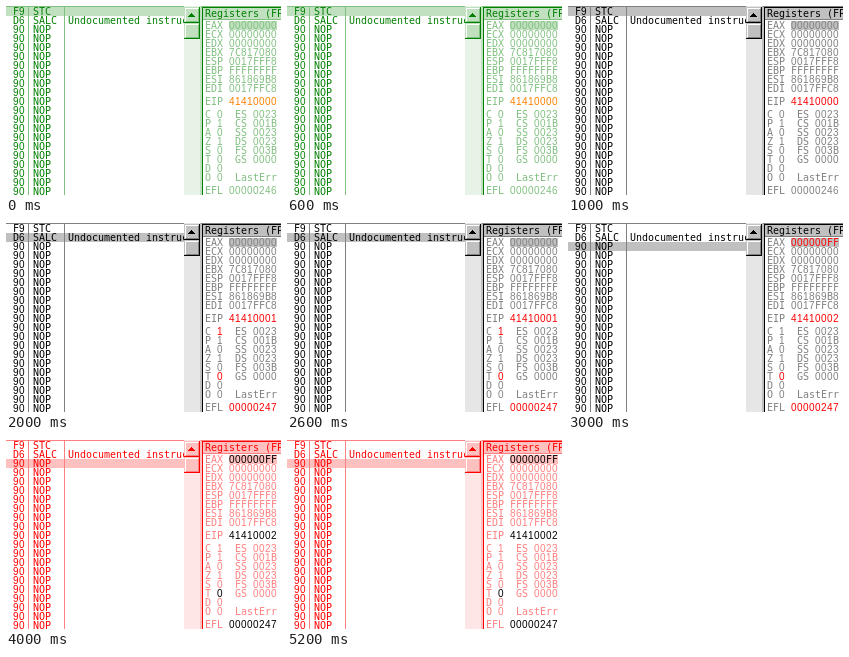
Write an HTML page with a canvas that moves like this. It is 275x189 px and loops after 6000 ms.

```html
<!DOCTYPE html>
<html lang="en">
<head>
<meta charset="utf-8">
<title>Stepping through instructions</title>
<style>
html, body { margin: 0; width: 100%; height: 100%; overflow: hidden; background: #fff; }
canvas { display: block; }
</style>
</head>
<body>
<canvas id="stage" width="275" height="189"></canvas>
<script>
const ctx = document.getElementById('stage').getContext('2d');
const CELL = 6, ROW = 9;

const plain = { ink: '#000', dim: '#808080', face: '#c0c0c0', track: '#e6e6e6', hot: '#f00' };
const green = { ink: '#008000', dim: '#80c080', face: '#c0e0c0', track: '#e6f3e6', hot: '#ff8000' };
const red = { ink: '#f00', dim: '#ff8080', face: '#ffc0c0', track: '#ffe6e6', hot: '#000' };

// line: selected instruction; hot: values changed by the last step
const steps = [
  { theme: green, line: 0, hot: 'EIP' },
  { theme: plain, line: 0, hot: 'EIP' },
  { theme: plain, line: 1, hot: 'EIP C T EFL' },
  { theme: plain, line: 2, hot: 'EAX EIP T EFL' },
  { theme: red, line: 2, hot: 'EAX EIP T EFL' }
];

function box(color, x, y, w, h) {
  ctx.fillStyle = color;
  ctx.fillRect(x, y, w, h);
}

// Digits use a face with an undotted zero, spaced to the same cell width.
function text(str, x, base, color) {
  ctx.fillStyle = color;
  for (const run of str.match(/\d+|\D+/g)) {
    const digits = /\d/.test(run);
    ctx.font = digits ? '10px "Liberation Sans", sans-serif' : '10px "DejaVu Sans Mono", monospace';
    ctx.letterSpacing = digits ? '0.44px' : '-0.02px';
    ctx.fillText(run, x, base);
    x += run.length * CELL;
  }
}

function raised(c, x, y, w, h) {
  box(c.ink, x, y, w, h);
  box(c.face, x, y, w - 1, h - 1);
  box('#fff', x + 1, y + 1, w - 3, h - 3);
  box(c.dim, x + 2, y + 2, w - 3, h - 3);
  box(c.face, x + 2, y + 2, w - 4, h - 4);
}

function drawCode(c, line) {
  ctx.save();
  ctx.beginPath();
  ctx.rect(0, 0, 178, 189);
  ctx.clip();
  box(c.dim, 0, 0, 178, 1);
  box(c.face, 0, 1 + line * ROW, 178, ROW);
  for (const x of [22, 58]) box(c.dim, x, 0, 1, 189);
  for (let i = 0; i < 21; i++) {
    const base = 9 + i * ROW;
    text(['F9', 'D6'][i] || '90', 7, base, c.ink);
    text(['STC', 'SALC'][i] || 'NOP', 27, base, c.ink);
  }
  text('Undocumented instruction', 62, 18, c.ink);
  ctx.restore();
}

function drawScrollbar(c) {
  box(c.track, 178, 0, 16, 189);
  raised(c, 178, 1, 16, 16);
  raised(c, 178, 17, 16, 16);
  for (let i = 0; i < 4; i++) box(c.ink, 185 - i, 7 + i, 1 + 2 * i, 1);
}

function drawRegisters(c, { line, hot }) {
  const changed = hot.split(' ');
  const tone = name => changed.includes(name) ? c.hot : c.dim;

  box(c.face, 194, 0, 2, 189);
  box(c.dim, 195, 0, 80, 1);
  box(c.ink, 196, 1, 79, 1);
  box(c.ink, 196, 1, 1, 188);
  box(c.face, 197, 2, 78, 11);
  box(c.dim, 197, 13, 78, 1);
  text('Registers (FPU)', 199, 11, c.ink);

  const register = (name, value, top) => {
    text(name, 199, top + 8, c.dim);
    text(value, 223, top + 8, tone(name));
  };
  box(c.face, 223, 15, 48, ROW);
  const values = {
    EAX: line === 2 ? '000000FF' : '00000000', ECX: '00000000', EDX: '00000000',
    EBX: '7C817080', ESP: '0017FFF8', EBP: 'FFFFFFFF', ESI: '861869B8', EDI: '0017FFC8'
  };
  Object.entries(values).forEach(([name, value], i) => register(name, value, 15 + i * ROW));
  register('EIP', '4141000' + line, 91);

  const flags = [
    ['C', line ? '1' : '0', 'ES 0023'], ['P', '1', 'CS 001B'], ['A', '0', 'SS 0023'],
    ['Z', '1', 'DS 0023'], ['S', '0', 'FS 003B'], ['T', '0', 'GS 0000'],
    ['D', '0', ''], ['O', '0', 'LastErr']
  ];
  flags.forEach(([name, bit, extra], i) => {
    const base = 112 + i * ROW;
    text(name, 199, base, c.dim);
    text(bit, 211, base, tone(name));
    if (extra) text(extra, 229, base, c.dim);
  });
  register('EFL', line ? '00000247' : '00000246', 180);
}

const start = performance.now();
function frame() {
  const t = (performance.now() - start) % 6000;
  const step = steps[Math.min(4, Math.floor(t / 1000))];
  box('#fff', 0, 0, 275, 189);
  drawCode(step.theme, step.line);
  drawScrollbar(step.theme);
  drawRegisters(step.theme, step);
  requestAnimationFrame(frame);
}
frame();
</script>
</body>
</html>
```
